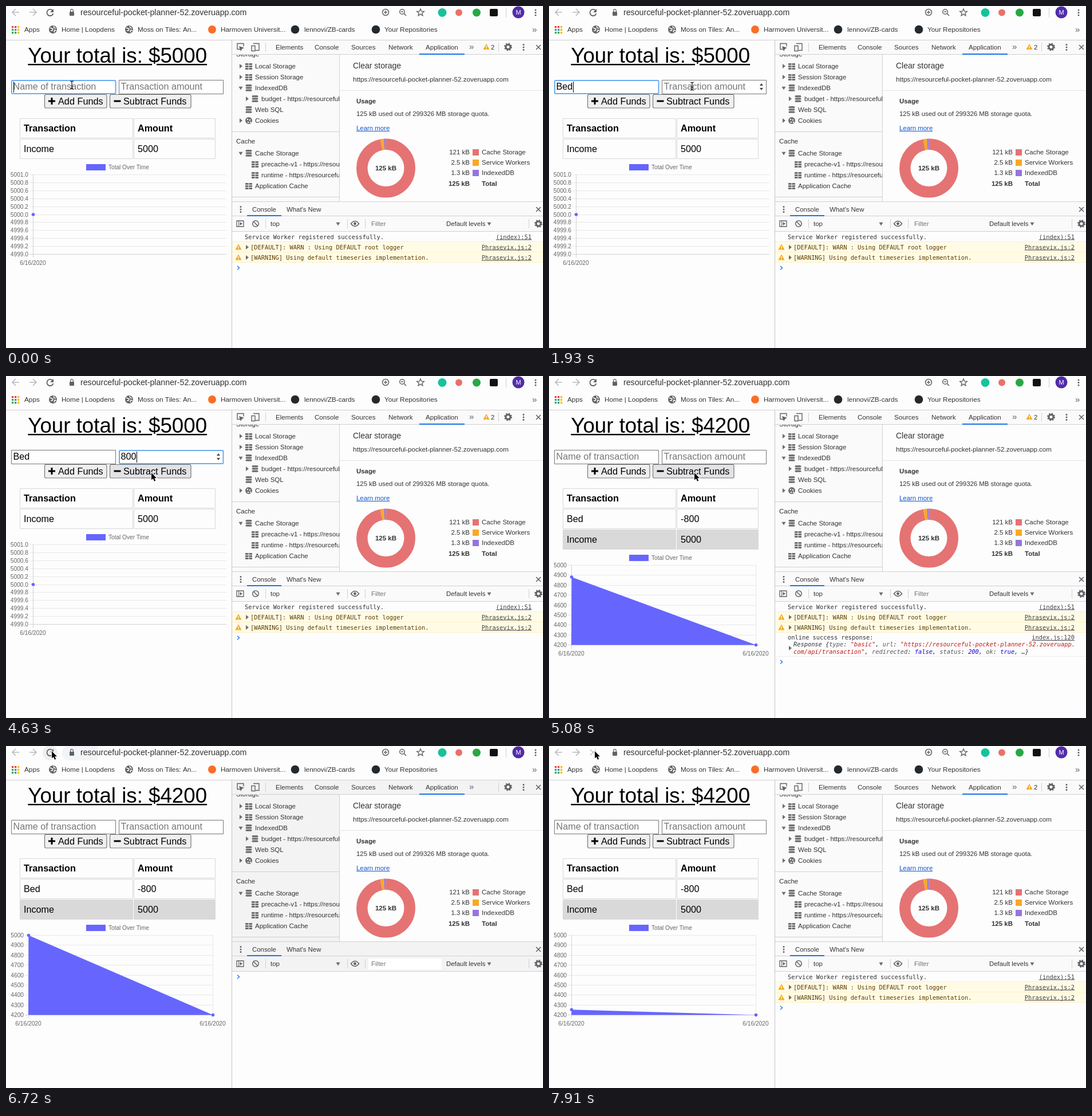
An HTML page with a canvas for the animation above (8000 ms loop, 938 by 597 pixels).

```html
<!DOCTYPE html>
<html lang="en">
<head>
<meta charset="utf-8">
<title>Budget page with developer tools</title>
<style>
html, body { margin: 0; width: 100%; height: 100%; overflow: hidden; background: #fdfdfd; }
canvas { display: block; }
</style>
</head>
<body>
<canvas id="stage" width="938" height="597"></canvas>
<script>
const c = document.getElementById('stage').getContext('2d');
const SANS = '"Liberation Sans", Arial, sans-serif';
const MONO = '"DejaVu Sans Mono", monospace';
const HOST = 'resourceful-pocket-planner-52.zoveruapp.com';
const URL_TEXT = 'https://' + HOST;
const GREY = '#5f6368', PAPER = '#fdfdfd', BLUE = '#6666ff', LINK = '#1a73e8';
const LOOP = 8000;

// Keyed values that hold until the next key
const ticks = [0, 300, 740, 1190, 1490, 1640, 1780, 1930, 2080, 2230, 2530, 2980, 3280, 3580, 3730,
  4180, 4330, 4480, 4630, 4780, 4930, 5080, 5230, 5380, 5530, 5680, 5820, 5970, 6120, 6270,
  6720, 6870, 7010, 7760, 7910];
const keys = {
  name: [[0, ''], [740, 'B'], [1490, 'Be'], [1640, 'Bed'], [4930, '']],
  amount: [[0, ''], [3280, '8'], [3580, '80'], [3730, '800'], [4930, '']],
  focus: [[0, 1], [2530, 2], [4780, 0]],
  caret: [[0, 1], [300, 0], [740, 1], [1190, 0], [1490, 1], [2080, 0], [2530, 1], [2980, 0],
    [3280, 1], [4180, 0], [4630, 1]],
  page: [[0, 'start'], [4780, 'spent'], [7010, 'empty'], [7760, 'spent']],
  bar: [[0, '#fafafa'], [6720, '#f3f3f3'], [7010, '#fafafa']],
  cursor: [[0, ['beam', 115, 138]], [740, null], [1780, ['beam', 170, 139]], [1930, ['beam', 250, 140]],
    [2080, ['beam', 257, 141]], [2230, ['beam', 255, 140]], [3280, null], [4180, ['beam', 255, 143]],
    [4330, ['arrow', 256, 160]], [4480, ['arrow', 254, 169]], [5530, ['arrow', 245, 155]],
    [5680, ['arrow', 212, 118]], [5820, ['arrow', 150, 58]], [5970, ['arrow', 106, 24]],
    [6120, ['arrow', 84, 11]], [6270, ['arrow', 80, 9]]]
};
const at = (list, t) => list.filter(k => k[0] <= t).pop()[1];

function text(s, x, y, size = 11.5, color = '#333', style = '', align = 'left', font = SANS) {
  c.font = `${style} ${size}px ${font}`;
  c.fillStyle = color;
  c.textAlign = align;
  c.fillText(s, x, y);
  return c.measureText(s).width;
}
const mono = (s, x, y, color = '#303030', style = '', align = 'left') =>
  text(s, x, y, 10.35, color, style, align, MONO);

function rect(x, y, w, h, color) { c.fillStyle = color; c.fillRect(x, y, w, h); }
function box(x, y, w, h, fill, stroke, r = 0, width = 1) {
  c.beginPath();
  c.roundRect(x, y, w, h, r);
  if (fill) { c.fillStyle = fill; c.fill(); }
  if (stroke) { c.strokeStyle = stroke; c.lineWidth = width; c.stroke(); }
}
function poly(points, fill) {
  c.beginPath();
  points.forEach(p => c.lineTo(...p));
  c.closePath();
  c.fillStyle = fill;
  c.fill();
}
function path(d, x, y, color = GREY, width = 1.6) {
  c.save();
  c.translate(x, y);
  c.strokeStyle = color;
  c.lineWidth = width;
  c.stroke(new Path2D(d));
  c.restore();
}
function dot(x, y, r, color) {
  c.beginPath();
  c.arc(x, y, r, 0, 7);
  c.fillStyle = color;
  c.fill();
}
function ring(x, y, r, color = GREY, width = 1.5) {
  c.beginPath();
  c.arc(x, y, r, 0, 2 * Math.PI);
  c.strokeStyle = color;
  c.lineWidth = width;
  c.stroke();
}
const hline = (x1, x2, y, color = '#d0d0d0') => rect(x1, y, x2 - x1, 1, color);
const vline = (x, y1, y2, color = '#d0d0d0') => rect(x, y1, 1, y2 - y1, color);

// Icons
const dots = (x, y) => [-4.5, 0, 4.5].forEach(d => dot(x, y + d, 1.5, GREY));
const cross = (x, y, r = 4, color = GREY) => path(`M${-r} ${-r}L${r} ${r}M${r} ${-r}L${-r} ${r}`, x, y, color);
const right = (x, y) => poly([[x - 2, y - 4], [x + 3, y], [x - 2, y + 4]], '#6e6e6e');
const down = (x, y, r = 3.5, color = '#6e6e6e') => poly([[x - r, y - r / 1.5], [x + r, y - r / 1.5], [x, y + r]], color);
function gear(x, y) {
  ring(x, y, 4, GREY, 3);
  c.setLineDash([2.36, 2.36]);
  ring(x, y, 6, GREY, 2);
  c.setLineDash([]);
}
function grid(x, y) {
  for (let i = 0; i < 6; i++) rect(x - 6 + i % 2 * 6.5, y - 5 + (i >> 1) * 4, 5.5, 3, '#6e6e6e');
}
function database(x, y) {
  for (let i = 0; i < 3; i++) box(x - 5.5, y - 6 + i * 4.2, 11, 3.3, '#6e6e6e', null, [4, 4, 3, 3]);
}
function cookie(x, y) {
  dot(x, y, 6, '#6e6e6e');
  [[-2, -2], [2, -1], [-1, 3], [3, 3]].forEach(([a, b]) => dot(x + a, y + b, 1.2, PAPER));
}
function globe(x, y) {
  dot(x, y, 7, GREY);
  path('M-5 -3L0 -1L-1 2L-4 2M1 -6L2 -3L5 -2M2 5L3 1L6 2', x, y, '#fff', 1.5);
}
function warning(x, y) {
  poly([[x, y - 5.5], [x + 5.5, y + 4.5], [x - 5.5, y + 4.5]], '#f4a81d');
  rect(x - .7, y - 2, 1.4, 3.4, '#fff');
  rect(x - .7, y + 2.2, 1.4, 1.3, '#fff');
}

function browserBar(t) {
  const hover = t >= 6720 && t < 7760;
  if (hover) {
    dot(77, 12, 13, '#eeeeee');
    if (t < 7010) box(98, -1, 62, 26, '#f3f4f5', null, [13, 0, 0, 13]);
  }
  path('M6 0H-6M0 -6L-6 0L0 6', 17, 11, '#b8babd');
  path('M-6 0H6M0 -6L6 0L0 6', 47, 11, '#b8babd');
  if (t >= 6870) cross(77, 11, 5, t >= 7910 ? '#c4c4c4' : GREY);
  else {
    path('M4 -4A5.6 5.6 0 1 0 5.5 1.5', 77, 11.5, GREY, 1.8);
    poly([[83, 5], [83, 11], [77, 11]], GREY);
  }
  box(111, 10, 8, 7, GREY, null, 1);
  path('M-2.3 0V-2A2.3 2.3 0 0 1 2.3 -2V0', 115, 10, GREY, 1.3);
  text(HOST, 130, 16, 14.2, '#333');
  ring(663, 11, 5.5);
  path('M-3 0H3M0 -3V3', 663, 11, GREY, 1.4);
  ring(692, 10, 4.3);
  path('M3 3L7 7M-2 0H2', 692, 10);
  let star = '';
  for (let i = 0; i < 10; i++) {
    const a = i * Math.PI / 5 - Math.PI / 2, r = i % 2 ? 2.9 : 6.6;
    star += (i ? 'L' : 'M') + r * Math.cos(a) + ' ' + r * Math.sin(a);
  }
  path(star + 'Z', 724, 11.5, GREY, 1.4);
  dot(762, 11.5, 7.5, '#15c39a');
  dot(791, 11.5, 6, '#e8716b');
  dot(822, 11.5, 7, '#27a844');
  box(845, 5, 14, 13, '#111', null, 2);
  vline(873, 3, 20);
  dot(895, 11, 10.5, '#512da8');
  text('M', 895, 15, 11, '#fff', '', 'center');
  dots(925, 11.5);

  const colors = ['#ea4335', '#ea4335', '#fbbc04', '#34a853', '#4285f4', '#fbbc04', '#34a853', '#34a853', '#fbbc04'];
  colors.forEach((col, i) => rect(10 + i % 3 * 5, 35 + (i / 3 | 0) * 5, 3.3, 3.3, col));
  globe(82, 41);
  globe(215, 41);
  dot(360, 41, 7, '#fc6d26');
  dot(505, 41, 7.3, '#24292e');
  dot(646, 41, 7.3, '#24292e');
  [['Apps', 32], ['Home | Loopdens', 97], ['Moss on Tiles: An...', 230], ['Harmoven Universit...', 375],
    ['lennovi/ZB-cards', 521], ['Your Repositories', 661]].forEach(([s, x]) => text(s, x, 45, 11.8));
  text('»', 919, 46, 15, GREY);
  hline(0, 938, 59, '#cfcfcf');
}

function field(x, hint, value, focused, caret) {
  if (focused) box(x + 1, 130, 181.5, 23, '#fff', '#6cacf0', 1.5, 2);
  else box(x + .5, 129.5, 182, 24, '#fff', '#767676');
  const w = text(value || hint, x + 3.5, 146, 16.2, value ? '#000' : '#757575');
  if (focused && caret) vline(Math.round(x + 4 + (value ? w : 0)), 132, 151, '#000');
}
function button(x, w, label, labelX, hover) {
  box(x + .5, 154.5, w, 23.5, hover ? '#e3e3e6' : '#efefef', '#767676', 2.5, 1.2);
  text(label, labelX, 172, 16.3, '#000');
}
function tableRow(y, a, b, style = '', shade = null) {
  box(24.5, y + .5, 197, 34, shade, '#d8d8d8');
  box(223.5, y + .5, 142, 34, shade, '#d8d8d8');
  text(a, 31, y + 23, 16.2, '#000', style);
  text(b, 230, y + 23, 16.2, '#000', style);
}
function chart(top, left, rightX, labels, dates, points) {
  const h = 139, gap = h / (labels.length - 1), bottom = top + h;
  rect(140, top - 18, 34, 11, BLUE);
  text('Total Over Time', 179, top - 9, 10.1, '#666');
  labels.forEach((s, i) => {
    const y = Math.round(top + i * gap);
    hline(left - 6, rightX, y, i === labels.length - 1 ? '#d2d2d2' : '#e8e8e8');
    text(s, left - 8, y + 4, 10.2, '#666', '', 'right');
  });
  dates.forEach((x, i) => {
    vline(x, top, bottom + 6, i ? '#e8e8e8' : '#d2d2d2');
    text('6/16/2020', x, bottom + 19, 10.2, '#666', '', 'center');
  });
  const spots = points.map((v, i) => [dates[i] + .5, bottom + .5 - v * h]);
  if (spots.length > 1) poly([...spots, [dates[1], bottom + .5], [left, bottom + .5]], BLUE);
  spots.forEach(([x, y]) => dot(x, y, 2.8, BLUE));
}

function budgetPage(t) {
  const get = k => at(keys[k], t), page = get('page'), focus = get('focus'), cur = get('cursor');
  const total = { start: 5000, spent: 4200, empty: 0 }[page];
  const w = text('Your total is: $' + total, 194.7, 99, 36.7, '#000', '', 'center');
  const x = 194.7 - w / 2;
  const dollar = x + c.measureText('Your total is: ').width + 10;
  rect(x, 101, dollar - 4 - x, 2.4, '#000');
  rect(dollar + 4, 101, x + w - dollar - 4, 2.4, '#000');

  field(9, 'Name of transaction', get('name'), focus === 1, get('caret'));
  field(197, 'Transaction amount', get('amount'), focus === 2, get('caret'));
  const over = cur && cur[0] === 'beam' && cur[1] > 197;
  if (focus === 2 || over) {
    poly([[368, 139], [374, 139], [371, 135]], '#444');
    poly([[368, 143], [374, 143], [371, 147]], '#444');
  }
  const onButton = cur && cur[0] === 'arrow' && cur[1] > 181 && cur[2] > 154;
  button(67, 108.5, 'Add Funds', 91, false);
  button(181, 141.5, 'Subtract Funds', 205, onButton);
  path('M-6 0H6M0 -6V6', 80, 166, '#000', 3);
  path('M-6 0H6', 194.5, 166, '#000', 3);

  tableRow(196, 'Transaction', 'Amount', 'bold');
  if (page === 'start') {
    tableRow(232, 'Income', '5000');
    chart(294, 47, 385, Array.from({ length: 11 }, (_, i) => (5001 - i / 5).toFixed(1)), [47], [.5]);
  } else if (page === 'spent') {
    tableRow(232, 'Bed', '-800');
    tableRow(268, 'Income', '5000', '', '#d9d9d9');
    const k = Math.min(1, Math.max(0, (t - (t < 7000 ? 4700 : 7893)) / 1000));
    chart(330, 39, 362, Array.from({ length: 9 }, (_, i) => 5000 - i * 100), [39, 361], [1 - (1 - k) ** 4, 0]);
  }
}

function storagePanel(t) {
  rect(395, 85, 188, 256, at(keys.bar, t));
  c.save();
  c.beginPath();
  c.rect(395, 85, 187, 256);
  c.clip();
  text('Storage', 402, 88);
  [['Local Storage', 105, grid, right], ['Session Storage', 124, grid, right], ['IndexedDB', 143, database, down],
    ['budget - ' + URL_TEXT, 162, database, right, 11], ['Web SQL', 181, database], ['Cookies', 200, cookie, right],
    ['Cache Storage', 257, database, down], ['precache-v1 - ' + URL_TEXT, 276, grid, null, 11],
    ['runtime - ' + URL_TEXT, 295, grid, null, 11], ['Application Cache', 314, grid]
  ].forEach(([s, y, icon, arrow, indent = 0]) => {
    if (arrow) arrow(410 + indent, y);
    icon(424 + indent, y);
    text(s, 435 + indent, y + 4);
  });
  text('Cache', 402, 240);
  hline(395, 582, 219);
  hline(395, 582, 333);
  c.restore();
  vline(582, 85, 341);

  text('Clear storage', 606, 109, 14);
  text(URL_TEXT, 606, 132, 11.6);
  hline(583, 938, 147, '#e4e4e4');
  text('Usage', 612, 170, 11.4, '#333', 'bold');
  text('125 kB used out of 299326 MB storage quota.', 612, 192, 11.4);
  const w = text('Learn more', 612, 217, 11.4, '#1155cc');
  hline(612, 612 + w, 218, '#1155cc');

  const parts = [['121 kB', 'Cache Storage', '#e57373', 121.2], ['2.5 kB', 'Service Workers', '#f9a825', 2.5],
    ['1.3 kB', 'IndexedDB', '#9575dd', 1.3]];
  let a = -Math.PI / 2;
  parts.forEach(([size, label, color, n], i) => {
    const end = a + n / 125 * 2 * Math.PI;
    c.beginPath();
    c.arc(663.5, 283, 41.7, a, end);
    c.strokeStyle = color;
    c.lineWidth = 19.5;
    c.stroke();
    a = end;
    const y = 259 + i * 18;
    text(size, 810, y, 11.5, '#333', '', 'right');
    rect(815, y - 9, 11, 11, color);
    text(label, 831, y);
  });
  text('125 kB', 663.5, 287, 11.5, '#333', 'bold', 'center');
  text('125 kB', 810, 314, 11.5, '#333', 'bold', 'right');
  text('Total', 831, 314, 11.5, '#333', 'bold');
}

function devtoolsBars(t) {
  const bar = at(keys.bar, t);
  rect(395, 60, 543, 25, bar);
  rect(395, 342, 543, 51, bar);
  vline(394, 60, 597, '#c4c4c4');
  hline(395, 938, 84);
  path('M3 4H-5V-6H6V-1', 409, 71.5, GREY, 1.4);
  poly([[407, 70], [416, 73], [412, 75], [410, 79]], GREY);
  path('M-3 -6H7V6H1M-6 -2H0V7H-6Z', 435, 71.5, GREY, 1.4);
  vline(453, 64, 80);
  [['Elements', 471], ['Console', 539], ['Sources', 603], ['Network', 668], ['Application', 733]]
    .forEach(([s, x]) => text(s, x, 75.5, 11.6));
  rect(722, 83, 79, 2, LINK);
  text('»', 809, 76, 15, GREY);
  if (t < 6720 || t >= 7760) {
    warning(839, 71.5);
    text('2', 847, 75.5);
  }
  vline(860, 64, 80);
  gear(877, 71.5);
  dots(904, 72);
  cross(930, 72);

  hline(395, 938, 341);
  dots(410, 355);
  text('Console', 430, 358.5, 11.4);
  text("What's New", 490, 358.5, 11.4);
  cross(930, 355);
  hline(395, 938, 366);
  rect(421, 365, 60, 2, LINK);
  box(403, 375, 12, 10, null, GREY, 0, 1.3);
  vline(406, 375, 385, GREY);
  poly([[408.5, 377], [413, 380], [408.5, 383]], GREY);
  ring(436, 380, 5.3);
  path('M-3.7 -3.7L3.7 3.7', 436, 380);
  [453, 596, 627, 913].forEach(x => vline(x, 372, 388));
  text('top', 462, 384);
  down(580, 380);
  path('M-7 0Q0 -9 7 0Q0 9 -7 0Z', 609.5, 380, GREY, 1.6);
  dot(609.5, 380, 2.4, GREY);
  if (t >= 6720 && t < 7010) rect(633, 371, 128, 19, '#fff');
  text('Filter', 638, 384, 11.5, '#757575');
  text('Default levels', 769, 384, 11.4);
  down(844, 380);
  gear(930, 380);
  hline(395, 938, 393);
}

function source(s, y) {
  const w = mono(s, 918, y, '#444', '', 'right');
  hline(918 - w, 918, y + 1, '#444');
}
function spans(x, y, parts) {
  parts.forEach(([s, color]) => x += mono(s, x, y, color, 'italic'));
}
function consoleLog(t) {
  let y = 394;
  const rule = (color = '#eeeeee') => hline(395, 938, y - 1, color);
  if (t < 6720 || t >= 7010) {
    mono('Service Worker registered successfully.', 417, y + 12.5);
    source('(index):51', y + 12.5);
    y += 18;
    rule();
  }
  if (t < 6720 || t >= 7760) {
    ['[DEFAULT]: WARN : Using DEFAULT root logger', '[WARNING] Using default timeseries implementation.'].forEach(s => {
      rect(395, y, 543, 18, '#fffbe5');
      warning(406, y + 9);
      right(421, y + 9);
      mono(s, 427, y + 12.5, '#5c3c00');
      source('Phrasevix.js:2', y + 12.5);
      y += 18;
      rule('#fff0c2');
    });
  }
  if (t >= 4930 && t < 6720) {
    const key = '#565656', str = '#c41a16', num = '#1c00cf', ink = '#303030';
    mono('online success response:', 417, y + 12);
    source('index.js:120', y + 12);
    right(421, y + 27);
    spans(427, y + 24, [['Response {', ink], ['type', key], [': ', ink], ['"basic"', str], [', ', ink], ['url', key],
      [': ', ink], ['"' + URL_TEXT.slice(0, -3), str]]);
    spans(427, y + 37, [['com/api/transaction"', str], [', ', ink], ['redirected', key], [': ', ink], ['false', num],
      [', ', ink], ['status', key], [': ', ink], ['200', num], [', ', ink], ['ok', key], [': ', ink], ['true', num],
      [', …}', ink]]);
    y += 42;
    rule();
  }
  path('M-2 -3.2L1.5 0L-2 3.2', 406, y + 9, '#367cf1', 1.5);
}

function pointer(cur) {
  if (!cur) return;
  const [shape, x, y] = cur;
  if (shape === 'beam') {
    path('M-3 -7Q0 -7 0 -5V5Q0 7 -3 7M3 -7Q0 -7 0 -5M0 5Q0 7 3 7M-1.5 2H1.5', x, y, '#111', 1.2);
    return;
  }
  c.save();
  c.translate(x, y);
  const arrow = new Path2D('M0 0V12.5L3 10L5 14.7L7.2 13.7L5.2 9.2H9Z');
  c.strokeStyle = '#fff';
  c.lineWidth = 2;
  c.stroke(arrow);
  c.fillStyle = '#000';
  c.fill(arrow);
  c.restore();
}

function draw(t) {
  rect(0, 0, 938, 597, PAPER);
  browserBar(t);
  budgetPage(t);
  devtoolsBars(t);
  storagePanel(t);
  consoleLog(t);
  pointer(at(keys.cursor, t));
}

const start = performance.now();
let shown = -1;
function frame() {
  const now = (performance.now() - start) % LOOP;
  const t = ticks.filter(k => k <= now).pop();
  if (t !== shown) draw(shown = t);
  requestAnimationFrame(frame);
}
frame();
</script>
</body>
</html>
```
